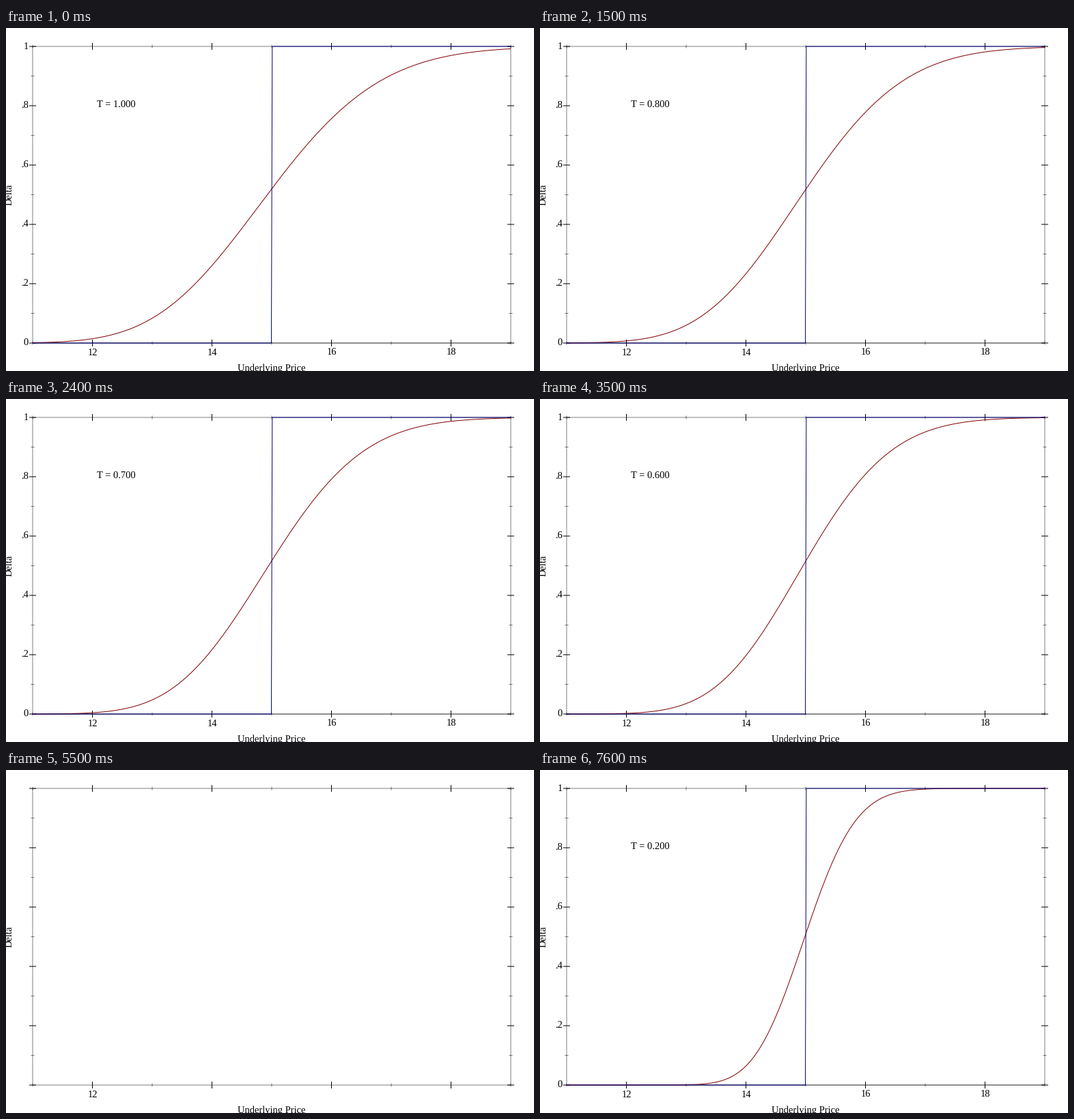
A matplotlib script for the animation above (8000 ms loop, 773 px wide and 503 px high).

```python
import math

import numpy as np
import matplotlib.pyplot as plt
from matplotlib.animation import FuncAnimation

W, H, DPI = 773, 503, 128
PX = 72 / DPI
LEFT, RIGHT, TOP, BOTTOM = 39, 739, 27, 462
STRIKE, SIGMA = 15, 0.1
RED, NAVY = "#800000", "#000080"
HAIR = 0.5

# Drawing stages: how much of the plot has been painted so far
FRAME, FIRST_TICK, LABELS, CURVES, FULL = range(5)

# (start in ms, time to expiry, stage)
TIMELINE = [
    (0, 1.0, FULL),
    (300, 0.9, LABELS), (500, 0.9, FULL),
    (1400, 0.8, CURVES), (1500, 0.8, FULL),
    (2300, 0.7, FRAME), (2400, 0.7, FULL),
    (3500, 0.6, FULL),
    (4600, 0.5, FULL),
    (5500, 0.4, FIRST_TICK), (5600, 0.4, FULL),
    (6500, 0.3, FULL),
    (7500, 0.2, CURVES), (7600, 0.2, FULL),
]
LOOP, STEP = 8000, 100

plt.rcParams["font.family"] = "Liberation Serif"
plt.rcParams["text.hinting"] = "none"
fig = plt.figure(figsize=(W / DPI, H / DPI), dpi=DPI, facecolor="white")
ax = fig.add_axes([0, 0, 1, 1])
ax.set_xlim(0, W)
ax.set_ylim(H, 0)
ax.axis("off")

staged = []


def px_x(price):
    return LEFT + (price - 11) * (RIGHT - LEFT) / 8


def px_y(delta):
    return BOTTOM - delta * (BOTTOM - TOP)


def line(x, y, color="black", width=1.0, z=2, cap="butt"):
    # Unsnapped, so strokes keep their exact sub-pixel positions
    art, = ax.plot(x, y, color=color, lw=width * PX, zorder=z, snap=False,
                   solid_capstyle=cap, solid_joinstyle="miter")
    return art


def label(x, y, text, stage, ha="center", **kw):
    art = ax.text(x, y, text, ha=ha, va="baseline", fontsize=14.5 * PX,
                  color="black", zorder=6, **kw)
    staged.append((art, stage))
    return art


def tick_style(major):
    return (5, 1.0) if major else (2.5, HAIR)


def tick_x(price, major):
    half, width = tick_style(major)
    x = px_x(price)
    for y in (TOP, BOTTOM):
        line([x, x], [y - half, y + half], width=width)


def tick_y(delta, major):
    half, width = tick_style(major)
    y = px_y(delta)
    for x in (LEFT, RIGHT):
        line([x - half, x + half], [y, y], width=width)


line([LEFT, RIGHT, RIGHT, LEFT, LEFT], [TOP, TOP, BOTTOM, BOTTOM, TOP],
     width=HAIR, z=1)
for price in range(11, 20):
    major = price % 2 == 0
    tick_x(price, major)
    if major:
        label(px_x(price), 480, str(price), FIRST_TICK if price == 12 else LABELS)
for i in range(11):
    major = i % 2 == 0
    tick_y(i / 10, major)
    if major:
        name = f".{i}" if 0 < i < 10 else str(i // 10)
        label(32.5, px_y(i / 10) + 3.7, name, LABELS, ha="right")

label(389, 503, "Underlying Price", FRAME)
label(8.5, 244, "Delta", FIRST_TICK, rotation=90, rotation_mode="anchor")
clock = label(132.7, 116.7, "", FULL, ha="left")

prices = np.linspace(11, 19, 701)
zero = line([LEFT, RIGHT], [BOTTOM, BOTTOM], width=HAIR, z=3)
curve = line([], [], RED, z=4)
payoff = line([LEFT, 388.5, 389.8, RIGHT], [BOTTOM, BOTTOM, TOP, TOP],
              NAVY, z=5, cap="projecting")
staged += [(zero, LABELS), (curve, CURVES), (payoff, CURVES)]


def call_delta(price, t):
    spread = SIGMA * math.sqrt(t)
    d1 = math.log(price / STRIKE) / spread + spread / 2
    return 0.5 * (1 + math.erf(d1 / math.sqrt(2)))


def draw(i):
    _, t, stage = [s for s in TIMELINE if s[0] <= i * STEP][-1]
    curve.set_data(px_x(prices), [px_y(call_delta(p, t)) for p in prices])
    clock.set_text(f"T = {t:.3f}")
    for art, needed in staged:
        art.set_visible(stage >= needed)
    return [art for art, _ in staged]


anim = FuncAnimation(fig, draw, frames=LOOP // STEP, interval=STEP,
                     repeat=True, repeat_delay=0, blit=False)
plt.show()
```
